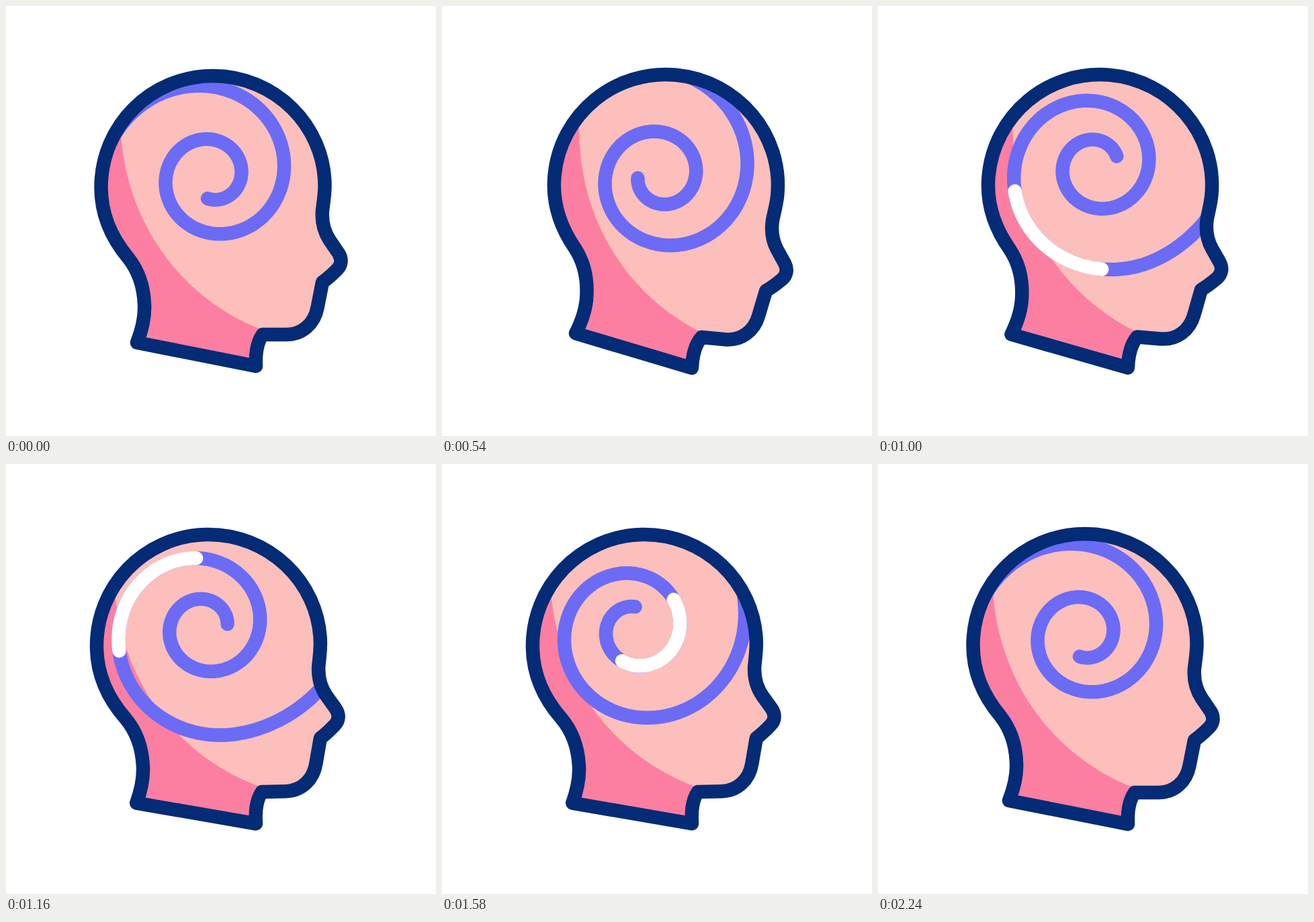
Recreate the animation shown at these times as an HTML page. Size 640x640 px, loop 2.4 s.

```html
<!DOCTYPE html>
<html lang="en">
<head>
<meta charset="utf-8">
<title>Hypnotic head</title>
<style>
  html, body { margin: 0; width: 100%; height: 100%; overflow: hidden; background: #fff; }
  svg { display: block; width: 100vw; height: 100vh; }
  .line { fill: none; stroke-width: 20.5; stroke-linecap: round; stroke-linejoin: round; }
</style>
</head>
<body>
<svg viewBox="0 0 640 640">
  <defs>
    <path id="profile" d="M195 501C204 478 207 462 206 444C205 418 197 394 182 375
      C156 344 141.500 309 141.500 270C141.500 178 216 104 308 104
      C400 104 474.500 178 474.500 268C474.500 280 472.500 292 471 304
      C469.500 322 474 337 482 349L495 368C500 376 500 385 493 392C487 398 480 405 471 411
      L463.500 449C459 473 441 489 417 489L382 489C374 500 371 514 372 536Z"/>
    <clipPath id="inside"><use href="#profile"/></clipPath>
  </defs>
  <g id="head">
    <use href="#profile" fill="#fcbfbb"/>
    <g clip-path="url(#inside)">
      <path fill="#fc7fa1" d="M171 190C180 325 262 437 384 483L384 560H100V190Z"/>
      <g id="swirl">
        <path id="spiral" class="line" stroke="#6b6bf6"/>
        <path id="glint" class="line" stroke="#fff"/>
      </g>
    </g>
    <use href="#profile" class="line" stroke="#042b76"/>
  </g>
</svg>
<script>
const LOOP = 2400;
const RAD = Math.PI / 180;
const GROWTH = Math.log(1 / 0.8) / 90;   // the radius shrinks to 80 % per quarter turn
const TIP = { x: 306.4, y: 253.2, radius: 34, angle: 100.8 };
const OUTER_TURN = 690;
const GLINT_REACH = 4.4;

const TILT = [[200, 0], [800, 9], [1400, -7], [1800, 6], [2200, 0]];
const SPIN = [[200, 0], [1200, 254], [2200, 0]];
const GLINT = [[350, GLINT_REACH], [1900, 0]];
const GLINT_DELAY = 200;

const $ = id => document.getElementById(id);
const head = $('head'), swirl = $('swirl'), glint = $('glint');

function eased(keys, time) {
  if (time <= keys[0][0]) return keys[0][1];
  for (let i = 1; i < keys.length; i++) {
    const [t0, v0] = keys[i - 1], [t1, v1] = keys[i];
    if (time < t1) {
      const x = (time - t0) / (t1 - t0);
      return v0 + (v1 - v0) * x * x * (3 - 2 * x);
    }
  }
  return keys[keys.length - 1][1];
}

// Logarithmic spiral counted in degrees from its inner tip; the outer end opens up a little.
function spiralPoint(turn) {
  const opening = 0.0048 * Math.max(0, turn - 640) ** 2;
  const r = TIP.radius * Math.exp(GROWTH * turn) + opening;
  const a = (TIP.angle - turn) * RAD;
  return (TIP.x + r * Math.cos(a)).toFixed(2) + ' ' + (TIP.y + r * Math.sin(a)).toFixed(2);
}

function spiralPath(from, to) {
  const steps = Math.max(1, Math.ceil((to - from) / 3));
  const points = [];
  for (let i = 0; i <= steps; i++) points.push(spiralPoint(from + (to - from) * i / steps));
  return 'M' + points.join('L');
}

const turnAt = length => Math.log(1 + length) / GROWTH;

function render(time) {
  head.setAttribute('transform', `rotate(${eased(TILT, time)} 342.5 536)`);
  swirl.setAttribute('transform', `rotate(${eased(SPIN, time)} 300.6 248.75)`);
  const lead = eased(GLINT, time);
  const tail = eased(GLINT, time - GLINT_DELAY);
  glint.setAttribute('d', tail - lead > 0.001 ? spiralPath(turnAt(lead), turnAt(tail)) : '');
}

$('spiral').setAttribute('d', spiralPath(0, OUTER_TURN));

const start = performance.now();
function tick() {
  render((performance.now() - start) % LOOP);
  requestAnimationFrame(tick);
}
tick();
</script>
</body>
</html>
```
